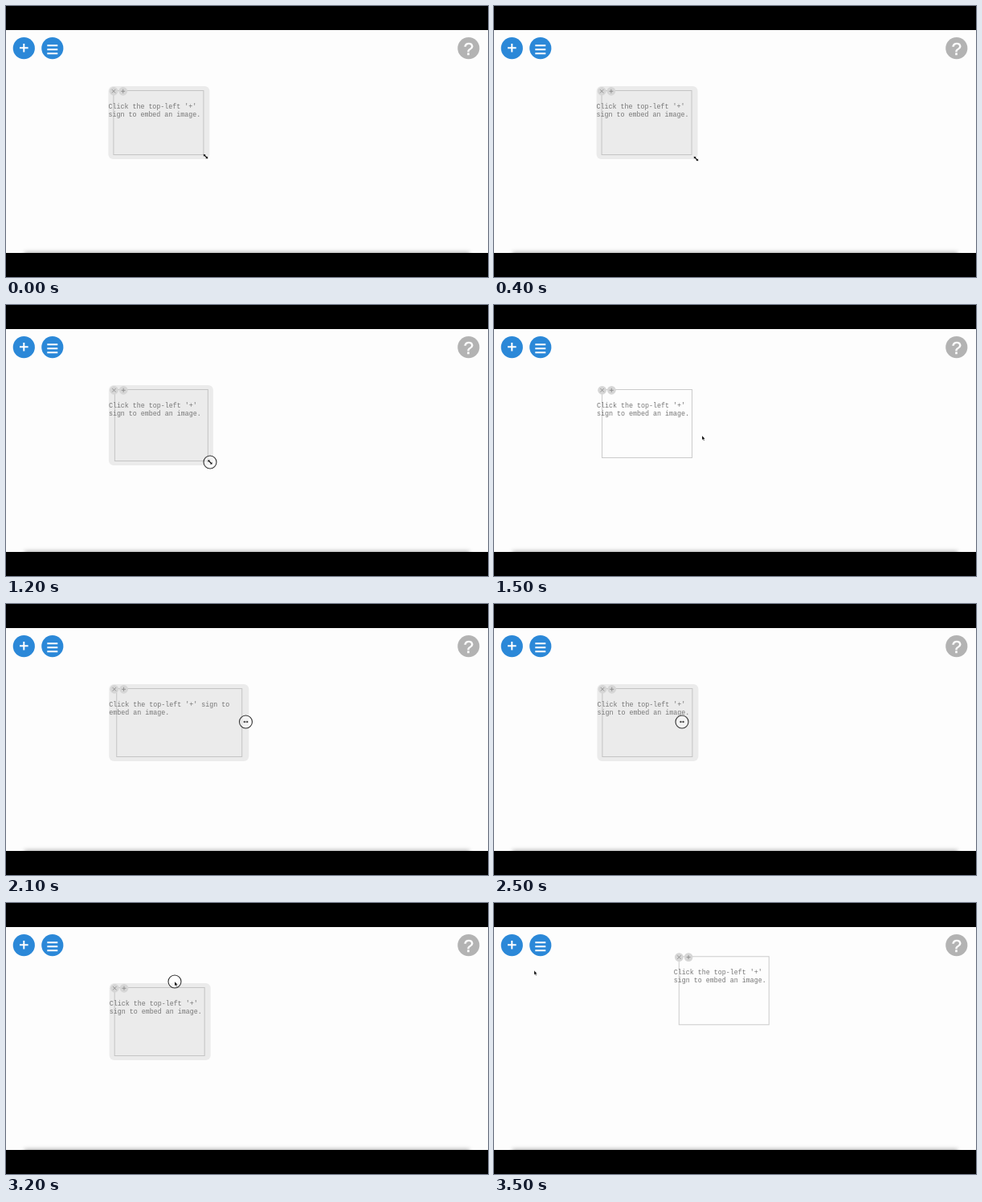
An HTML page for the animation above (3.6 s loop, 600 px wide and 338 px high).

```html
<!DOCTYPE html>
<html lang="en">
<head>
<meta charset="utf-8">
<title>Resizable image box</title>
<style>
  html, body { margin: 0; width: 100%; height: 100%; overflow: hidden; background: #000; }
  #stage { position: relative; width: 600px; height: 338px; overflow: hidden; }
  #page { position: absolute; top: 30px; width: 600px; height: 278px; background: #fdfdfd; overflow: hidden; }
  #page::after {
    content: ""; position: absolute; left: 24px; right: 24px; bottom: -4px; height: 4px;
    box-shadow: 0 0 5px 1px #aaa;
  }
  svg { position: absolute; left: 0; top: 0; }
  #panel { position: absolute; left: 0; top: 0; border-radius: 6px; }
  #panel.hover { background: #ebebeb; }
  #frame { position: absolute; inset: 5%; border: 1px solid #cbcbcb; box-sizing: border-box; }
  .hover #frame { border-color: #c4c4c4; }
  #panel p {
    position: absolute; left: 0; top: 21px; width: 100%; margin: 0; color: #777;
    font: 8.33px/10px "Courier New", "Liberation Mono", monospace;
  }
</style>
</head>
<body>
<div id="stage">
  <div id="page"></div>
  <svg width="600" height="338" fill="none" stroke="#fff" stroke-width="2">
    <g stroke="none">
      <circle cx="22.3" cy="52.7" r="13.6" fill="#2b88d8"/>
      <circle cx="57.8" cy="52.7" r="13.6" fill="#2b88d8"/>
      <circle cx="575.8" cy="52.7" r="13.6" fill="#b3b3b3"/>
      <text x="575.8" y="60.5" fill="#fff" font-size="22" text-anchor="middle"
        font-family="Liberation Sans, Arial, sans-serif" stroke="#fff" stroke-width=".5">?</text>
    </g>
    <path d="M17 52.3h10.6M22.3 47v10.6M51.3 49.2h13M51.3 54.2h13M51.3 59.2h13"/>
  </svg>
  <div id="panel">
    <div id="frame"></div>
    <svg width="24" height="14" fill="none" stroke="#8c8c8c" stroke-width=".9">
      <g fill="#d6d6d6" stroke="none"><circle cx="6.6" cy="6.3" r="5.4"/><circle cx="18.3" cy="6.3" r="5.4"/></g>
      <path d="M4.4 4.1l4.4 4.4M8.8 4.1l-4.4 4.4M15.8 6.3h5M18.3 3.8v5"/>
    </svg>
    <p>Click the top-left '+' sign to embed an image.</p>
  </div>
  <svg width="600" height="338">
    <g id="pointer">
      <circle id="ring" r="8" fill="#fff" fill-opacity=".4" stroke="#333" stroke-width="1.1"/>
      <path id="arrow" d="M0 0v5.2l1.2-1 .9 2 .9-.4-.9-1.9h1.6z" fill="#000" stroke="#fff" stroke-width=".3"/>
      <path id="sizer" d="M-4 0l2.4-2v1.3h3.2V-2L4 0 1.6 2V.7h-3.2V2z" fill="#000" stroke="#fff" stroke-width=".3"/>
    </g>
  </svg>
</div>
<script>
const $ = id => document.getElementById(id);
const STEP = 100, STEPS = 36, MIN_W = 125.5;

// step, x, y, cursor (a: arrow, d: diagonal, h: horizontal; upper case: pressed)
const keys = [
  [0, 248.5, 187.7, 'd'], [1, 65, 56, 'a'], [2, 158, 124, 'a'], [3, 243, 185, 'd'],
  [4, 251.5, 190.5, 'd'], [6, 251, 191, 'D'], [7, 262, 199, 'D'], [9, 320, 221, 'D'],
  [10, 334.7, 227.5, 'D'], [11, 318, 219, 'D'], [12, 254, 196, 'D'], [13, 252, 194, 'd'],
  [14, 256.5, 178, 'a'], [15, 259, 163, 'a'], [18, 257, 152, 'a'], [19, 253, 149, 'h'],
  [20, 252, 147, 'H'], [22, 345, 147, 'H'], [23, 353, 147, 'H'], [24, 347, 147, 'H'],
  [25, 234, 147, 'H'], [26, 228, 140, 'a'], [30, 210, 101, 'A'], [32, 210, 98, 'A'],
  [33, 305, 62.5, 'A'], [34, 180, 76, 'a'], [35, 50, 84.3, 'a']
];

function pointerAt(step) {
  const i = keys.findLastIndex(k => k[0] <= step);
  const a = keys[i], b = keys[i + 1] || a;
  const u = (step - a[0]) / (b[0] - a[0] || 1);
  return { x: a[1] + (b[1] - a[1]) * u, y: a[2] + (b[2] - a[2]) * u, kind: a[3] };
}

function panelAt(step, { x: px, y: py, kind }) {
  const moved = step >= 33;
  const x = moved ? 223.8 : 127.4 + step * 0.04;
  const y = moved ? 61.3 : 100;
  const sizing = kind === 'D' || kind === 'H';
  const w = sizing ? Math.max(MIN_W, px + 4 - x) : MIN_W;
  const h = kind === 'D' ? py + 4 - y : step < 6 ? 91 : 95.5;
  const hover = px >= x && px <= x + w + 2 && py >= y - 3 && py <= y + h + 3;
  return { x, y, w, h, hover };
}

function draw(now) {
  const step = Math.floor(now / STEP) % STEPS;
  const p = pointerAt(step), box = panelAt(step, p);
  const kind = p.kind.toLowerCase(), panel = $('panel');

  panel.style.transform = `translate(${box.x}px, ${box.y}px)`;
  panel.style.width = box.w + 'px';
  panel.style.height = box.h + 'px';
  panel.className = box.hover ? 'hover' : '';

  $('pointer').setAttribute('transform', `translate(${p.x} ${p.y})`);
  $('ring').style.display = p.kind === kind ? 'none' : '';
  $('arrow').style.display = kind === 'a' ? '' : 'none';
  $('sizer').style.display = kind === 'a' ? 'none' : '';
  $('sizer').setAttribute('transform', kind === 'd' ? 'rotate(45)' : 'scale(.8)');
}

const start = performance.now();
function loop() {
  draw(performance.now() - start);
  requestAnimationFrame(loop);
}
loop();
</script>
</body>
</html>
```
